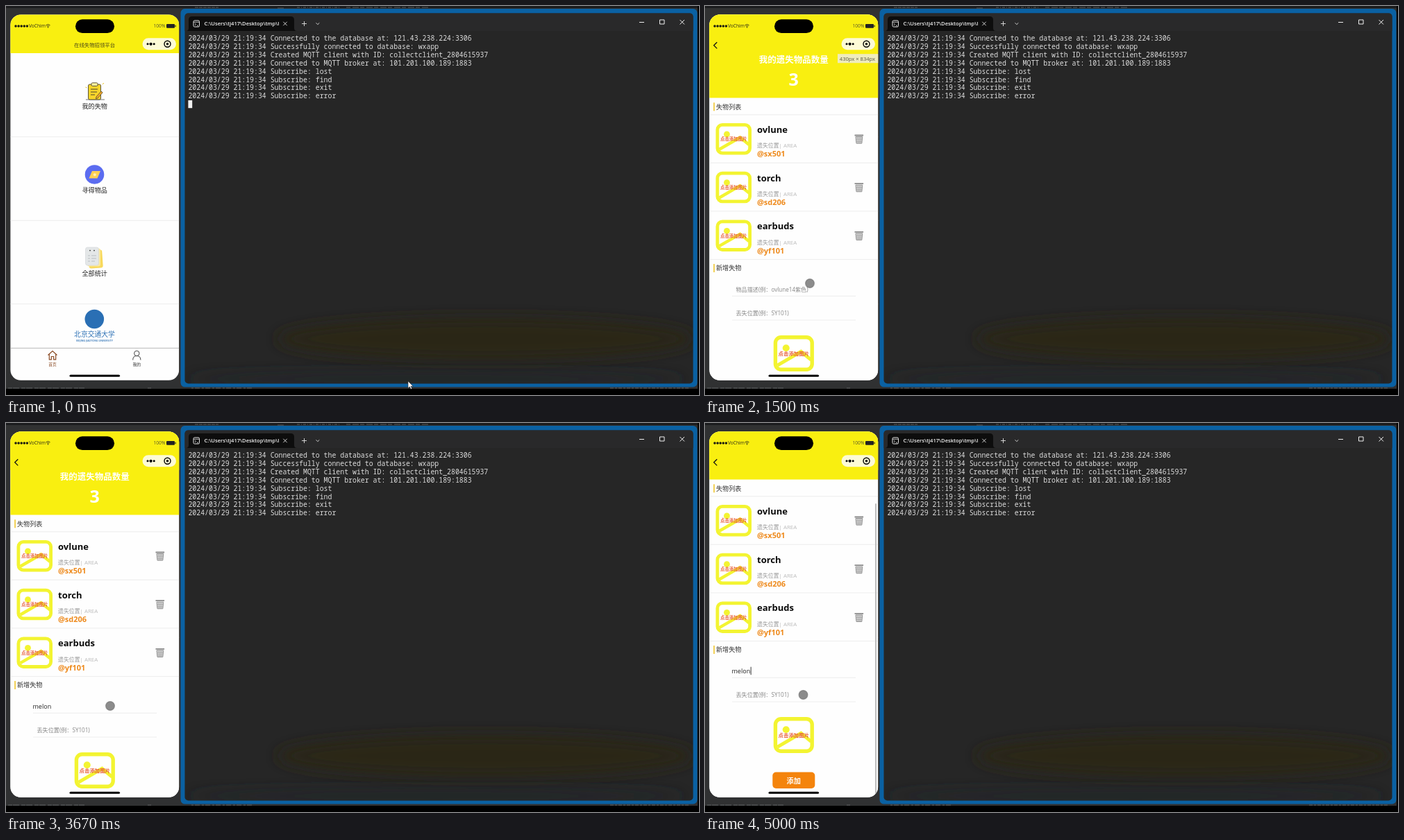
Animation of 998 by 561 pixels, one loop 5080 ms. Source, as an HTML page:

```html
<!DOCTYPE html>
<html lang="zh">
<head>
<meta charset="utf-8">
<title>Lost and found</title>
<style>
html, body { margin: 0; width: 100%; height: 100%; overflow: hidden; background: #000; }
svg { display: block; width: 998px; height: 561px; }
text { font-family: "Open Sans", "Noto Sans CJK SC", "Noto Sans CJK", sans-serif; white-space: pre; }
text.mono { font-family: "Noto Sans Mono", monospace; }
</style>
</head>
<body>
<svg id="stage" viewBox="0 0 998 561" xmlns="http://www.w3.org/2000/svg"></svg>
<script>
const YELLOW = '#f9ef10', LEMON = '#f3f431', LOOP = 5080, FPS = 12;

// Shape helpers: each returns SVG markup.
const rect = (x, y, w, h, fill, r = 0, more = '') =>
  `<rect x="${x}" y="${y}" width="${w}" height="${h}" rx="${r}" fill="${fill}" ${more}/>`;
const circle = (x, y, r, fill, more = '') =>
  `<circle cx="${x}" cy="${y}" r="${r}" fill="${fill}" ${more}/>`;
const path = (d, stroke, width = 1, fill = 'none', more = '') =>
  `<path d="${d}" stroke="${stroke}" stroke-width="${width}" fill="${fill}" ${more}/>`;
const line = (x1, y, x2, color = '#e9e9e9') => path(`M${x1} ${y}H${x2}`, color, .8);
// y is the vertical middle of the text
const text = (x, y, str, size, fill, more = '') =>
  `<text x="${x}" y="${y + size * .37}" font-size="${size}" fill="${fill}" ${more}>${str}</text>`;
const mid = 'text-anchor="middle"', bold = 'font-weight="700"';
const group = (content, more = '') => `<g ${more}>${content}</g>`;

function desktop() {
  const bits = (x, y, w, dash) =>
    path(`M${x} ${y}h${w}`, '#77797b', 1.4, 'none', `stroke-dasharray="${dash}" opacity=".45"`);
  return rect(0, 0, 998, 561, '#000') + rect(0, 3, 996, 549, '#303132') +
    rect(0, 0, 996, 3, '#1b1c1e') +
    bits(272, 2, 34, '5 1') + bits(391, 3, 9, '9') + bits(419, 2, 62, '4 2 1 2') +
    bits(490, 2, 120, '6 3 9 2') +
    bits(3, 551, 110, '6 1 9 3') + bits(204, 551, 5, '5') + bits(267, 551, 90, '3 2 7 3') +
    bits(870, 551, 115, '5 2 3 2');
}

function terminal() {
  const glow = (x, y, rx, ry, color) =>
    `<ellipse cx="${x}" cy="${y}" rx="${rx}" ry="${ry}" fill="${color}" filter="url(#soft)"/>`;
  const log = [
    'Connected to the database at: 121.43.238.224:3306',
    'Successfully connected to database: wxapp',
    'Created MQTT client with ID: collectclient_2804615937',
    'Connected to MQTT broker at: 101.201.100.189:1883',
    ...['lost', 'find', 'exit', 'error'].map(s => 'Subscribe: ' + s)
  ];
  return rect(251.5, 4, 744, 545.5, '#0a61a3', 6) +
    rect(257.5, 10.5, 732, 534, '#262626', 5) +
    group(glow(690, 480, 300, 30, '#2a2819') + glow(620, 538, 360, 8, '#23272a'), 'clip-path="url(#pane)"') +
    path('M257.5 36V15.5q0-5 5-5H984.5q5 0 5 5V36z', 'none', 0, '#29292a') +
    path('M259 36q4 0 4-4V20q0-5 5-5H410q5 0 5 5V32q0 4 4 4z', 'none', 0, '#0d0d0d') +
    rect(270, 21, 8.5, 9, 'none', 1.5, 'stroke="#e6e6e6"') +
    path('M270 23.3h8.5M272 28l1.6-1.5-1.6-1.5M275 28.2h2', '#e6e6e6', .8) +
    text(285.5, 25.5, 'C:\\Users\\tj417\\Desktop\\tmp\\l', 7.6, '#f4f4f4', 'font-weight="600"') +
    path('M399.3 22.8l5.4 5.4m0-5.4l-5.4 5.4M426 25.5h7m-3.5-3.5v7M446.5 24.3l2.4 2.4 2.4-2.4', '#e2e2e2', .9) +
    path('M912 23.5h7M941.5 20h6.5v6h-6.5zM970.5 20l6.5 6.5m0-6.5l-6.5 6.5', '#f0f0f0', 1) +
    log.map((s, i) => text(262.4, 46.6 + i * 11.86, '2024/03/29 21:19:34 ' + s, 9.87, '#dcdcdc', 'class="mono"')).join('') +
    rect(262.4, 136, 5.8, 11.2, '#f2f2f2', 0, 'id="block"');
}

function statusBar() {
  let dots = '';
  for (let i = 0; i < 5; i++) dots += circle(14 + i * 4.1, 29, 1.75, '#1c1c10');
  return dots + text(33, 28.8, 'VoChim', 6.6, '#2a2a18') +
    path('M57.5 27.8q3-2.6 6 0M58.8 29.3q1.7-1.4 3.4 0', '#2a2a18', .9) + circle(60.5, 30.8, .8, '#2a2a18') +
    rect(100, 19.3, 56, 19.8, '#000', 9.9) +
    text(212.5, 29, '100%', 6.6, '#55552c') +
    rect(231, 26, 12, 5.8, '#222', 1.3) + rect(243.6, 27.6, 1.1, 2.6, '#222', .5) +
    rect(196.5, 46.3, 48.5, 17, '#fdfbd6', 8.5) +
    circle(204, 54.8, 1.5, '#000') + circle(208.6, 54.8, 2.1, '#000') + circle(213.2, 54.8, 1.5, '#000') +
    circle(232.5, 54.8, 4.5, 'none', 'stroke="#000" stroke-width="1.4"') + circle(232.5, 54.8, 1.8, '#000');
}

function homePage() {
  const clipboard =
    line(115, 135, 142, '#555') +
    rect(118.5, 113, 18, 22, '#f8d52b', 2, 'stroke="#4a4430" stroke-width=".9"') +
    rect(123, 110.8, 9, 4.6, '#fff3a0', 1.5, 'stroke="#4a4430" stroke-width=".9"') +
    path('M122 120h10M122 124h9M122 128h6', '#4a4430', 1) +
    path('M130 131l7-8 2.2 1.8-7 8-2.8.9z', '#4a4430', .8, '#f7a928') +
    path('M114.5 117l2 1M139 113l2-2', '#e8bd20', 1);
  const compass = circle(127.5, 243, 13.8, '#5b6cf0') +
    path('M119.5 248.5l4.5-10.5h12l-4.5 10.5z', 'none', 0, '#ffd052') + circle(127.8, 243.2, 2, '#fff0b8');
  const sheets = rect(119, 352, 20, 26, '#f8d95c', 3, 'transform="rotate(-4 129 365)"') +
    rect(117, 349.5, 19, 26, '#fbe9a0', 3) +
    rect(114.5, 348, 19, 26, '#e4e7e8', 3, 'stroke="#d2d6d8" stroke-width=".6"') +
    circle(121, 352.6, .9, '#333') + circle(127, 352.6, .9, '#333') +
    path('M118 360h3m2 0h7M118 364h3m2 0h7M118 368h3m2 0h5', '#b9bec2', 1);
  const label = (y, s) => text(127.7, y, s, 9.1, '#222', mid);
  return rect(6, 12, 243.5, 528, '#fefefe') + rect(6, 12, 243.5, 56, YELLOW) +
    text(127.6, 56.4, '在线失物招领平台', 7.4, '#4c4918', mid) +
    [188.7, 309.3, 429.7].map(y => line(6, y, 249.5)).join('') +
    clipboard + label(145, '我的失物') + compass + label(265.3, '寻得物品') + sheets + label(385.8, '全部统计') +
    circle(127.3, 451.5, 13.8, '#2a6fb4') +
    text(127.5, 473.7, '北京交通大学', 9.8, '#2a6fb4', mid + ' font-weight="500"') +
    text(127.5, 482.4, 'BEIJING JIAOTONG UNIVERSITY', 3.6, '#2a6fb4', mid + ' font-weight="600"') +
    line(6, 493.4, 249.5, '#aaa') +
    path('M60.5 503.5l6.5-6 6.5 6M62.3 502.5v7.3h3v-4.3h3.4v4.3h3v-7.3', '#8a4a23', 1.2) +
    text(67, 516.4, '首页', 5.8, '#8a4a23', mid) +
    circle(188.3, 501, 3.7, 'none', 'stroke="#444"') +
    path('M182.7 510.5q0-6 5.6-6t5.6 6', '#444', 1) +
    text(188.3, 516.4, '我的', 5.8, '#333', mid);
}

function photoSlot(x, y, w, h) {
  const k = w / 58;
  return group(
    rect(x + 2.7 * k, y + 2.7 * k, w - 5.4 * k, h - 5.4 * k, '#fff', 8 * k, `stroke="${LEMON}" stroke-width="${5.4 * k}"`) +
    circle(x + w * .31, y + h * .35, 5 * k, LEMON) +
    path(`M${x + w * .1} ${y + h * .83}L${x + w * .68} ${y + h * .45}L${x + w * .93} ${y + h * .68}`, LEMON, 5 * k) +
    text(x + w / 2, y + h / 2, '点击添加图片', w > 55 ? 7.4 : 6.4, '#e8603a', mid + ' ' + bold));
}

function lostRow(name, place, i) {
  const y = 157 + i * 69.7;
  const bin = path(`M215.5 ${y + 29.5}h12.6`, '#8a8a8a', 1.8) +
    path(`M217 ${y + 31.5}h9.8l-1 9.6h-7.8z`, '#909090', 1, '#d6d6d6') +
    path(`M219.6 ${y + 32}l.6 9M222 ${y + 32}v9M224.4 ${y + 32}l-.6 9M217.5 ${y + 35}h9M218 ${y + 38.3}h8`, '#999', .6);
  return photoSlot(15.5, y + 12, 51.5, 45.5) +
    text(75, y + 21.2, name, 13, '#0b0b0b', bold) +
    text(75, y + 44.4, '遗失位置<tspan fill="#bbb">| AREA</tspan>', 7.9, '#999') +
    text(75, y + 56.4, place, 11, '#ee8a1c', bold) + bin + line(6, y + 69.2, 249.5);
}

function lostPage() {
  const heading = (y, s) => rect(12.2, y - 6, 1.7, 12, '#f0c93a') + text(16, y, s, 9.1, '#333');
  const items = [['ovlune', '@sx501'], ['torch', '@sd206'], ['earbuds', '@yf101']];
  const body = rect(6, 12, 243.5, 120.5, YELLOW) +
    text(127.7, 77, '我的遗失物品数量', 12.5, '#fff', mid + ' ' + bold) +
    text(127.7, 105.5, '3', 25, '#fff', mid + ' ' + bold) +
    heading(145.3, '失物列表') + line(6, 156.8, 249.5) +
    items.map(([name, place], i) => lostRow(name, place, i)).join('') +
    heading(378, '新增失物') +
    text(44.5, 408.8, '物品描述(例：ovlune14紫色)', 8.1, '#888', 'id="hint"') +
    text(38.5, 408.8, '', 9, '#222', 'id="typed"') +
    rect(62.6, 402.7, .9, 11.5, '#222', 0, 'id="caret"') + line(39, 418.3, 217) +
    text(44.5, 443.5, '丢失位置(例：SY101)', 8.1, '#888') + line(39, 453, 217) +
    photoSlot(98.7, 475, 58.2, 52) +
    rect(97.3, 554.5, 61, 23.5, '#f4840c', 5) +
    text(127.8, 566.8, '添加', 10.2, '#fff', mid + ' ' + bold);
  return rect(6, 12, 243.5, 528, '#fefefe') + group(body, 'id="scroll"') +
    rect(6, 12, 243.5, 56, YELLOW) + path('M17.3 52.2l-4.6 4.6 4.6 4.6', '#111', 1.3) +
    rect(245, 116, 2, 419, '#bdbdbd', 1, 'id="bar"');
}

const $ = id => document.getElementById(id);
$('stage').innerHTML =
  `<defs><filter id="soft" x="-50%" y="-300%" width="200%" height="700%"><feGaussianBlur stdDeviation="10"/></filter>
  <clipPath id="pane">${rect(257.5, 10.5, 732, 534, '#000', 5)}</clipPath>
  <clipPath id="screen">${rect(6.4, 12.4, 242.8, 527.4, '#000', 15)}</clipPath></defs>` +
  desktop() + terminal() +
  group(
    homePage() + group(lostPage(), 'id="lost"') + statusBar() +
    group(rect(191, 69.2, 59, 13, '#efecbd') + text(193.8, 75.8, '430px × 834px', 7.6, '#55553f'), 'id="size"') +
    rect(91.5, 531.8, 72.5, 3, '#000', 1.5),
    'clip-path="url(#screen)"') +
  circle(0, 0, 6.4, '#8c8c8c', 'id="dot" stroke="#6f6f6f" stroke-opacity=".6" stroke-width="1.2"') +
  path('M0 0V10.2l2.4-2.2 1.6 3.6 1.7-.8-1.6-3.4h3.2z', '#222', .6, '#fff', 'id="arrow"');

// Pointer stops: [tick, x, y]
const stops = [[3, 579, 541], [12, 145, 157], [14, 145, 157], [18, 151, 400], [24, 150, 408], [48, 150, 408], [54, 141.5, 392]];
const ease = (n, a, b) => {
  const p = Math.min(1, Math.max(0, (n - a) / (b - a)));
  return p * p * (3 - 2 * p);
};

function pointer(n) {
  let [, x, y] = stops[0];
  for (let i = 1; i < stops.length; i++) {
    const [t0, x0, y0] = stops[i - 1], [t1, x1, y1] = stops[i], p = ease(n, t0, t1);
    x += (x1 - x0) * p;
    y += (y1 - y0) * p;
  }
  return [x, y];
}

const show = (id, on) => $(id).setAttribute('visibility', on ? 'inherit' : 'hidden');
const move = (id, x, y) => $(id).setAttribute('transform', `translate(${x} ${y})`);

function draw(ms) {
  const n = Math.floor((ms % LOOP + 4) * FPS / 1000);
  const [x, y] = pointer(n), inPhone = x < 250;
  show('dot', inPhone);
  show('arrow', !inPhone);
  move('dot', x, y);
  move('arrow', x, y);

  show('block', n < 15);
  show('lost', n >= 15);
  move('lost', 243.5 * (1 - ease(n, 14, 16)), 0);
  show('size', n >= 15 && n < 24);

  const word = 'melon'.slice(0, Math.max(0, n - 37));
  $('typed').textContent = word;
  show('hint', !word);
  show('caret', n >= 37 && (n < 44 || n >= 50));
  $('caret').setAttribute('x', 39 + $('typed').getComputedTextLength());
  move('scroll', 0, -51 * ease(n, 46, 51));
  show('bar', n >= 47);
}

const start = performance.now();
function tick() {
  draw(performance.now() - start);
  requestAnimationFrame(tick);
}
tick();
</script>
</body>
</html>
```
